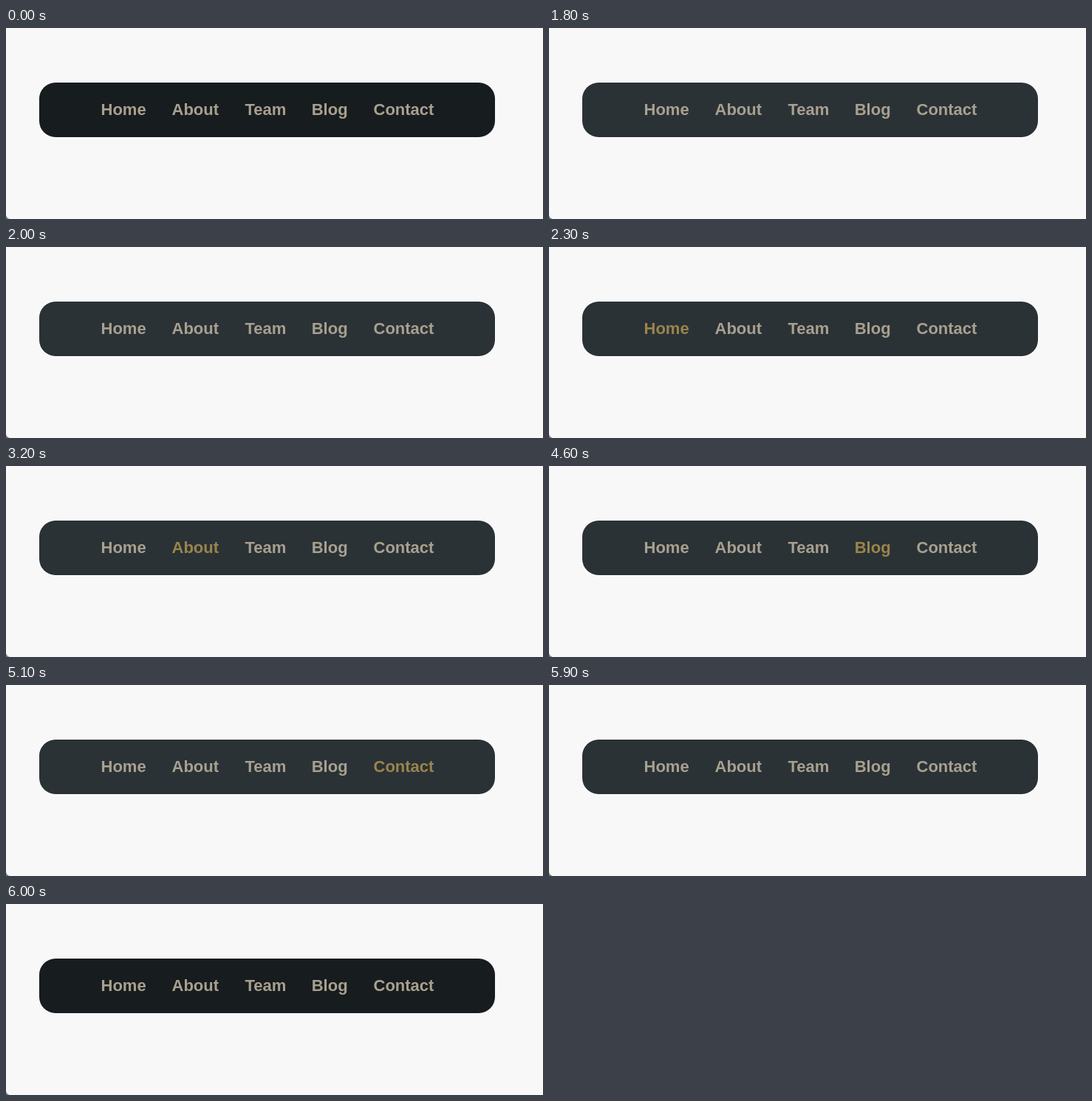
Recreate the animation shown at these times as an HTML page. Size 727 by 259 pixels, loop 6.6 s.

```html
<!DOCTYPE html>
<html lang="en">
<head>
<meta charset="utf-8">
<title>Navigation bar</title>
<style>
  html, body { margin: 0; width: 100%; height: 100%; overflow: hidden; background: #f8f8f8; }
  svg { display: block; width: 100%; height: 100%; }
  text { font: bold 22px "Liberation Sans", Arial, sans-serif; }
</style>
</head>
<body>
<svg id="stage" viewBox="0 0 727 259">
  <rect width="727" height="259" fill="#f8f8f8"/>
  <path d="M0 253.5Q0.8 257.8 5 259H0Z" fill="#77797a"/>
  <rect id="glow" x="44" y="73" width="619" height="76" rx="23" fill="#fff"/>
  <rect id="bar" x="45" y="74" width="617" height="74" rx="22"/>
</svg>
<script>
const LOOP = 6600;
const BAR = { idle: "#171c1e", hover: "#2a3236", from: 1800, to: 6000 };
const LINK = { idle: "#a8a08f", hover: "#9a844c" };
// label, x, hover start, hover end
const links = [
  ["Home", 128.5, 2300, 3000],
  ["About", 224.5, 3200, 4000],
  ["Team", 323.5, 4000, 4600],
  ["Blog", 413.7, 4600, 4900],
  ["Contact", 497.5, 5100, 5900]
];

const stage = document.getElementById("stage");
const bar = document.getElementById("bar");
const glow = document.getElementById("glow");

const labels = links.map(([name, x]) => {
  const label = document.createElementNS("http://www.w3.org/2000/svg", "text");
  label.textContent = name;
  label.setAttribute("x", x);
  label.setAttribute("y", 118);
  stage.append(label);
  return label;
});

const during = (t, from, to) => t >= from && t < to;

function draw(t) {
  const over = during(t, BAR.from, BAR.to);
  bar.setAttribute("fill", over ? BAR.hover : BAR.idle);
  glow.setAttribute("visibility", over ? "visible" : "hidden");
  links.forEach(([, , from, to], i) => {
    labels[i].setAttribute("fill", during(t, from, to) ? LINK.hover : LINK.idle);
  });
}

const start = performance.now();
function tick() {
  draw((performance.now() - start) % LOOP);
  requestAnimationFrame(tick);
}
tick();
</script>
</body>
</html>
```
